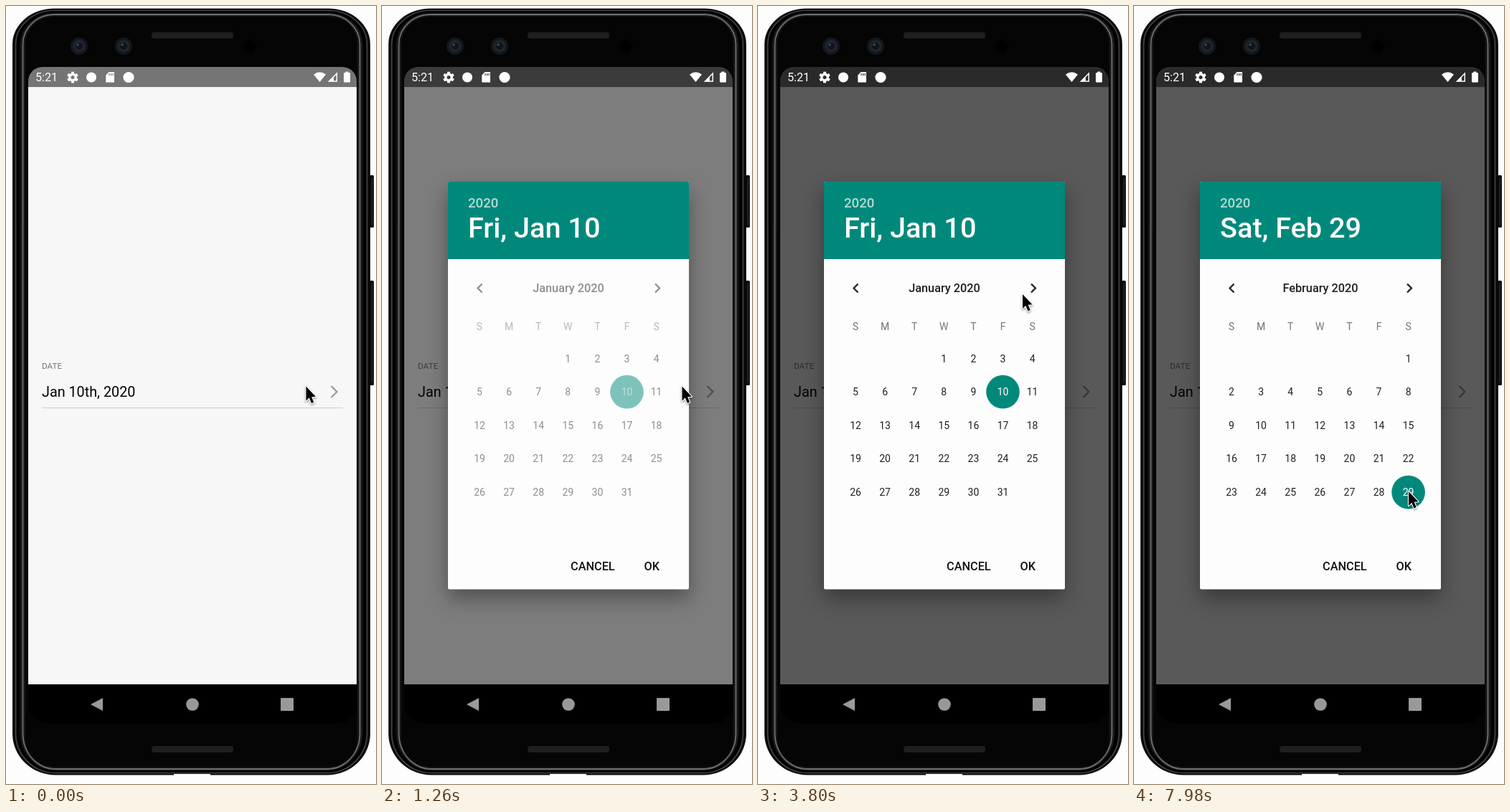
Animation of 516x1085 px, one loop 8000 ms. Source, as an HTML page with a canvas:

```html
<!DOCTYPE html>
<html lang="en">
<head>
<meta charset="utf-8">
<title>Date picker</title>
<style>
html, body { margin: 0; width: 100%; height: 100%; overflow: hidden; background: #fdfdfd; }
canvas { display: block; width: 516px; height: 1085px; }
</style>
</head>
<body>
<canvas id="stage" width="516" height="1085"></canvas>
<script>
const W = 516, H = 1085, LOOP = 8000, TAU = Math.PI * 2;
const PAPER = '#fdfdfd', TEAL = '#00897b', INK = '#212121';
const FONT = 'Roboto, "Liberation Sans", sans-serif';

const stage = document.getElementById('stage').getContext('2d');
const newLayer = () => Object.assign(document.createElement('canvas'), { width: W, height: H }).getContext('2d');
const phone = newLayer();
const dialog = newLayer();

const lerp = (a, b, p) => a + (b - a) * p;
const ramp = (t, from, to) => Math.min(1, Math.max(0, (t - from) / (to - from)));
const smooth = p => p * p * (3 - 2 * p);

// Cursor stops: time, x, y
const stops = [
  [0, 418.5, 530.5], [2900, 418.5, 530.5], [3650, 369, 402], [3950, 369, 402],
  [4350, 387, 391], [5650, 387, 391], [6450, 368, 673], [6850, 368, 673],
  [7150, 383, 677], [LOOP, 383, 677]
];
const PICK = 7560;
const months = [
  { name: 'January 2020', first: 3, days: 31 },
  { name: 'February 2020', first: 6, days: 29 }
];

function rect(c, x, y, w, h, color) {
  c.fillStyle = color;
  c.fillRect(x, y, w, h);
}

function roundPath(c, x, y, w, h, r) {
  c.beginPath();
  c.roundRect(x, y, w, h, r);
}

function round(c, x, y, w, h, r, color) {
  roundPath(c, x, y, w, h, r);
  c.fillStyle = color;
  c.fill();
}

function disc(c, x, y, r, color) {
  c.beginPath();
  c.arc(x, y, r, 0, TAU);
  c.fillStyle = color;
  c.fill();
}

function trace(c, points, closed) {
  c.beginPath();
  points.forEach(([x, y]) => c.lineTo(x, y));
  if (closed) c.closePath();
}

function poly(c, points, color) {
  trace(c, points, true);
  c.fillStyle = color;
  c.fill();
}

function text(c, s, x, y, size, color, weight = 400, align = 'left') {
  c.font = `${weight} ${size}px ${FONT}`;
  c.textAlign = align;
  c.fillStyle = color;
  c.fillText(s, x, y);
}

// dir 1 points right, -1 points left
function chevron(c, x, y, size, dir, color, width) {
  const half = size / 2 * dir;
  trace(c, [[x - half, y - size], [x + half, y], [x - half, y + size]]);
  c.strokeStyle = color;
  c.lineWidth = width;
  c.stroke();
}

function bodyPath(c, ix, iy) {
  const top = { x: 58 - ix, y: 50 - iy }, bottom = { x: 60 - ix, y: 58 - iy };
  roundPath(c, 9 + ix, 3.5 + iy, 499 - 2 * ix, 1069 - 2 * iy, [top, top, bottom, bottom]);
}

function drawPhone(c) {
  rect(c, 0, 0, W, H, PAPER);
  for (const [y, h] of [[236, 73], [383, 146]]) {
    round(c, 505, y, 8, h, 1.5, '#0c0c0e');
    rect(c, 510, y + 4, 1, h - 8, '#37373a');
  }
  bodyPath(c, 0, 0);
  c.fillStyle = '#09090a';
  c.fill();
  // Metal rim: inset x, inset y, width, colour
  const rims = [[4.5, 3, 1.5, '#48484c'], [8, 5, 3, '#000'], [12, 7, 1, '#2a2a2c'],
                [14.5, 8.5, 2, '#6c6c71'], [17, 11, 2, '#161618']];
  for (const [ix, iy, width, color] of rims) {
    bodyPath(c, ix, iy);
    c.strokeStyle = color;
    c.lineWidth = width;
    c.stroke();
  }
  round(c, 27, 15, 463, 1046, 38, '#050506');
  rect(c, 234, 1071, 51, 4, PAPER);

  for (const x of [102, 164]) {
    disc(c, x, 56, 12, '#14171c');
    disc(c, x, 56, 8.5, '#20252d');
    disc(c, x, 56, 5, '#10141b');
    disc(c, x - 2, 54, 1.8, '#394555');
  }
  disc(c, 340, 56, 9, '#000');
  round(c, 203, 36.5, 114, 9, 4, '#1f1f20');
  round(c, 203, 1032, 114, 9, 4, '#1f1f20');

  round(c, 31, 85, 458, 916, [20, 20, 28, 28], '#000');
  round(c, 31, 85, 458, 28, [20, 20, 0, 0], '#757575');
  rect(c, 31, 113, 458, 833, '#f7f7f7');

  poly(c, [[118, 974], [135, 965], [135, 983]], '#999');
  disc(c, 260, 974, 8.8, '#999');
  round(c, 383, 965, 18, 18, 1, '#999');

  text(c, 'DATE', 50, 506, 11.7, '#757575');
  text(c, 'Jan 10th, 2020', 50, 545, 19.8, '#000');
  chevron(c, 457.5, 538, 8, 1, '#999', 2.2);
  rect(c, 50, 560, 420, 1, '#cdcdc8');
}

function drawStatus(c) {
  const white = '#fff';
  text(c, '5:21', 41, 105, 16.2, white);

  c.save();
  c.translate(93, 99.5);
  for (let i = 0; i < 6; i++) {
    rect(c, -2, -7.8, 4, 4, white);
    c.rotate(TAU / 6);
  }
  c.beginPath();
  c.arc(0, 0, 4.2, 0, TAU);
  c.lineWidth = 3.4;
  c.strokeStyle = white;
  c.stroke();
  c.restore();

  disc(c, 119, 99.5, 7, white);

  c.beginPath();
  for (const p of [[143.5, 92], [151, 92], [151, 106.5], [139.3, 106.5], [139.3, 96.5]]) c.lineTo(...p);
  c.closePath();
  for (const x of [143.4, 146, 148.6]) c.rect(x, 94, 1.2, 3);
  c.fillStyle = white;
  c.fill('evenodd');

  disc(c, 171, 99.5, 7.6, white);

  c.beginPath();
  c.moveTo(437.5, 106);
  c.lineTo(429, 95.5);
  c.quadraticCurveTo(437.5, 89, 446, 95.5);
  c.closePath();
  c.fill();

  trace(c, [[450.5, 105], [461.3, 105], [461.3, 94]], true);
  c.strokeStyle = white;
  c.lineWidth = 1.5;
  c.stroke();
  poly(c, [[450, 105], [457, 105], [457, 98.5]], white);

  rect(c, 473.5, 91.5, 4, 2, white);
  round(c, 471, 93, 9, 13.5, 1, white);
}

function drawMonth(c, m, dx, picked) {
  text(c, m.name, 260 + dx, 399, 16.3, INK, 500, 'center');
  const column = i => 136 + 41.1 * i + dx;
  [...'SMTWTFS'].forEach((d, i) => text(c, d, column(i), 452, 14, '#757575', 400, 'center'));
  for (let day = 1; day <= m.days; day++) {
    const cell = m.first + day - 1;
    const x = column(cell % 7), y = 491.5 + 46.65 * Math.floor(cell / 7);
    if (day === picked) disc(c, x, y, 23.3, TEAL);
    text(c, day, x, y + 5, 14, day === picked ? '#fff' : INK, 400, 'center');
  }
}

function drawDialog(c, t) {
  c.clearRect(0, 0, W, H);
  c.save();
  c.shadowColor = 'rgba(0,0,0,.36)';
  c.shadowBlur = 28;
  c.shadowOffsetY = 13;
  round(c, 92, 245, 336, 568.5, 2, PAPER);
  c.restore();
  round(c, 92, 245, 336, 108, [2, 2, 0, 0], TEAL);

  const done = t >= PICK;
  text(c, '2020', 120, 281, 18.65, 'rgba(255,255,255,.7)', 500);
  text(c, done ? 'Sat, Feb 29' : 'Fri, Jan 10', 120, 323, 39.65, '#fff', 500);
  text(c, 'CANCEL', 263, 787, 16.3, '#111', 500);
  text(c, 'OK', 365.5, 787, 16.3, '#111', 500);

  c.save();
  c.beginPath();
  c.rect(92, 353, 336, 400);
  c.clip();
  c.globalAlpha = ramp(t, 955, 1564);
  const slide = 1 - (1 - ramp(t, 4780, 5100)) ** 3;
  if (slide < 1) drawMonth(c, months[0], -336 * slide, 10);
  if (slide > 0) drawMonth(c, months[1], 336 * (1 - slide), done ? 29 : 0);

  const press = ramp(t, 4700, 4880), fade = 1 - ramp(t, 5260, 5560);
  if (press > 0 && fade > 0) {
    c.globalAlpha = press * fade;
    disc(c, 384, 393, lerp(20, 39, smooth(press)), '#dadada');
    c.globalAlpha = 1;
  }
  chevron(c, 136.5, 393.5, 6, -1, INK, 2.3);
  chevron(c, 384, 393.5, 6, 1, INK, 2.3);
  c.restore();
}

function drawCursor(c, t) {
  const i = Math.max(1, stops.findIndex(s => s[0] > t));
  const [t0, x0, y0] = stops[i - 1], [t1, x1, y1] = stops[i];
  const p = smooth(ramp(t, t0, t1));
  c.save();
  c.translate(lerp(x0, x1, p), lerp(y0, y1, p));
  c.scale(1.14, 1.14);
  trace(c, [[0, 0], [0, 17.5], [3.8, 13.9], [6.6, 20.6], [9.4, 19.4], [6.7, 12.9], [11.8, 12.6]], true);
  c.lineJoin = 'round';
  c.lineWidth = 2;
  c.strokeStyle = '#fff';
  c.shadowColor = 'rgba(0,0,0,.4)';
  c.shadowBlur = 3;
  c.shadowOffsetY = 1.5;
  c.stroke();
  c.shadowColor = 'transparent';
  c.fillStyle = '#000';
  c.fill();
  c.restore();
}

function render(t) {
  const c = stage;
  c.drawImage(phone.canvas, 0, 0);
  const dim = 0.6 * ramp(t, 1000, 1318) + 0.04 * ramp(t, 1318, 1560);
  if (dim > 0) round(c, 31, 85, 458, 861, [20, 20, 0, 0], `rgba(0,0,0,${dim})`);
  drawStatus(c);
  const shown = ramp(t, 1035, 1172);
  if (shown > 0) {
    drawDialog(dialog, t);
    c.globalAlpha = shown;
    c.drawImage(dialog.canvas, 0, 0);
    c.globalAlpha = 1;
  }
  drawCursor(c, t);
}

drawPhone(phone);
const start = performance.now();
function tick() {
  render((performance.now() - start) % LOOP);
  requestAnimationFrame(tick);
}
tick();
</script>
</body>
</html>
```
